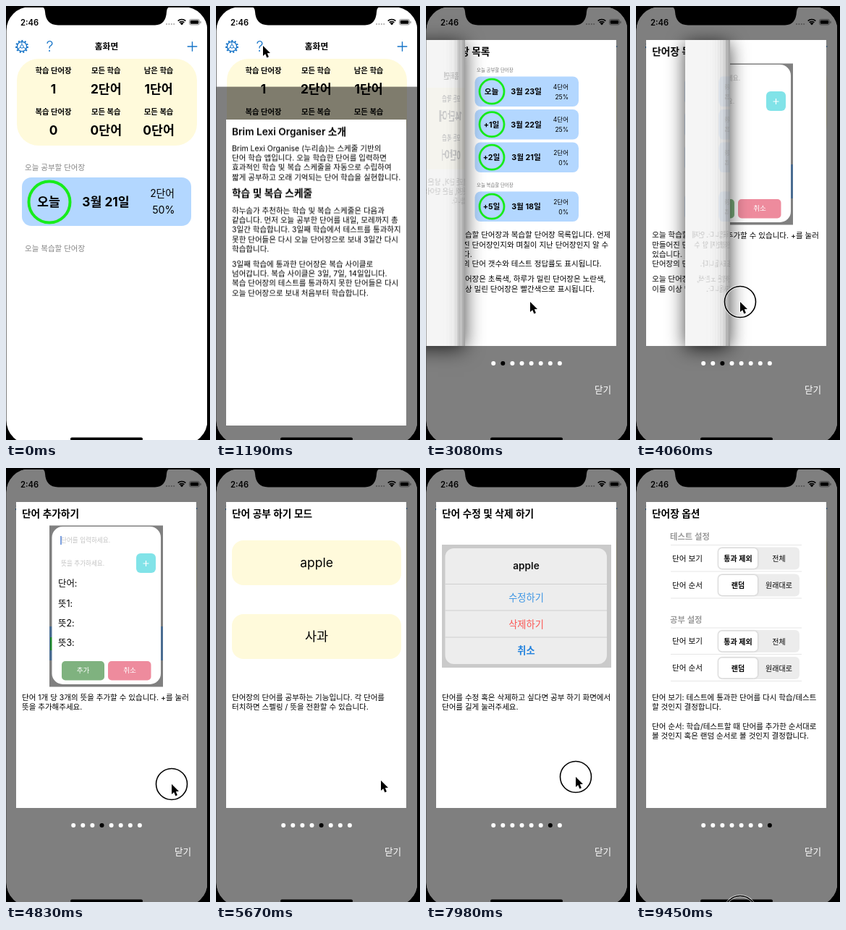
Write an HTML page with a canvas that moves like this. It is 282 px wide and 600 px high and loops after 9.52 s.

```html
<!DOCTYPE html>
<html lang="ko">
<head>
<meta charset="utf-8">
<title>단어장 도움말</title>
<style>
html, body { margin: 0; width: 100%; height: 100%; overflow: hidden; background: #000; }
canvas { display: block; width: 282px; height: 600px; }
</style>
</head>
<body>
<canvas id="stage"></canvas>
<script>
const W = 282, H = 600, LOOP = 9520, STEP = 70;
const PAGE = { x: 14, y: 47, w: 249, h: 423 };
const BLUE = '#1674c8', CARD = '#b3d7ff', CREAM = '#fffadb', GREEN = '#17ec1c';
const FONT = "Inter, 'Noto Sans CJK KR', 'Noto Sans CJK', sans-serif";
const scale = window.devicePixelRatio || 1;

function surface(canvas, w, h) {
  canvas.width = w * scale;
  canvas.height = h * scale;
  const g = canvas.getContext('2d');
  g.scale(scale, scale);
  return g;
}

function text(g, s, x, y, size, color = '#000', weight = 400, align = 'left') {
  g.font = `${weight} ${size}px ${FONT}`;
  g.fillStyle = color;
  g.textAlign = align;
  g.fillText(s, x, y + size * 0.36);
}
const mid = (g, s, x, y, size, color, weight) => text(g, s, x, y, size, color, weight, 'center');
const title = (g, s, y = 63) => text(g, s, 22, y, 13.7, '#000', 600);
const lines = (g, y, ...rows) => rows.forEach((s, i) => text(g, s, 22, y + i * 13.3, 10.5));

function box(g, x, y, w, h, r, color) {
  g.fillStyle = color;
  g.beginPath();
  g.roundRect(x, y, w, h, r);
  g.fill();
}
function ring(g, x, y, r, width, color) {
  g.strokeStyle = color;
  g.lineWidth = width;
  g.beginPath();
  g.arc(x, y, r, 0, 7);
  g.stroke();
}
function stroke(g, color, width, ...segments) {
  g.strokeStyle = color;
  g.lineWidth = width;
  g.beginPath();
  for (const [x1, y1, x2, y2] of segments) { g.moveTo(x1, y1); g.lineTo(x2, y2); }
  g.stroke();
}
const cross = (g, x, y, r, width, color) =>
  stroke(g, color, width, [x - r, y - r, x + r, y + r], [x - r, y + r, x + r, y - r]);
const plus = (g, x, y, r, width, color) =>
  stroke(g, color, width, [x - r, y, x + r, y], [x, y - r, x, y + r]);
const rule = (g, x1, x2, y, color = '#ddd') => stroke(g, color, 1, [x1, y, x2, y]);

function summary(g, values) {
  box(g, 15, 73, 249, 120, 30, CREAM);
  const labels = ['학습 단어장', '모든 학습', '남은 학습', '복습 단어장', '모든 복습', '모든 복습'];
  labels.forEach((label, i) => {
    const x = 65.5 + (i % 3) * 72.8, y = i < 3 ? 89 : 146.5;
    mid(g, label, x, y, 10.3, '#000', 600);
    mid(g, values[i], x, y + 25.5, 17.3, '#000', 700);
  });
}

function gear(g, x, y) {
  g.setLineDash([2, 2.6]);
  ring(g, x, y, 8, 2, BLUE);
  g.setLineDash([]);
  ring(g, x, y, 6.6, 1.4, BLUE);
  ring(g, x, y, 2.2, 1, BLUE);
  for (let a = 0.5; a < 6; a += 2.094)
    stroke(g, BLUE, 1, [x + 2 * Math.cos(a), y + 2 * Math.sin(a), x + 6 * Math.cos(a), y + 6 * Math.sin(a)]);
}

function statusBar(g) {
  text(g, '2:46', 20, 22.5, 11.2, '#000', 600);
  for (let i = 0; i < 4; i++) box(g, 221 + i * 3.4, 24, 2, 2, 1, '#a5a5a5');
  g.lineCap = 'butt';
  [2, 5, 8].forEach((r, i) => {
    g.strokeStyle = '#000';
    g.lineWidth = i ? 1.7 : 3;
    g.beginPath();
    g.arc(243, 26.5, r, -2.3, -0.84);
    g.stroke();
  });
  g.strokeStyle = '#777';
  g.lineWidth = 0.8;
  g.beginPath();
  g.roundRect(253.5, 18.5, 14, 7.5, 2.2);
  g.stroke();
  box(g, 254.7, 19.7, 11.6, 5.1, 1.2, '#000');
  box(g, 268.5, 21, 1, 3, 0.5, '#777');
}

function home(g) {
  g.fillStyle = '#fff';
  g.fillRect(0, 2, 278, H);
  statusBar(g);
  gear(g, 22, 56);
  mid(g, '?', 60.5, 56, 20, BLUE, 300);
  mid(g, '홈화면', 139, 55.5, 11.7, '#000', 600);
  plus(g, 257.5, 56, 6.8, 1.4, BLUE);
  summary(g, ['1', '2단어', '1단어', '0', '0단어', '0단어']);
  text(g, '오늘 공부할 단어장', 26, 223, 10.5, '#858585');
  box(g, 22, 237, 234, 67, 13, CARD);
  ring(g, 60, 271, 28.5, 4, GREEN);
  mid(g, '오늘', 59, 271, 17.3, '#000', 700);
  mid(g, '3월 21일', 138, 271, 17.3, '#000', 700);
  text(g, '2단어', 233, 259.5, 13.8, '#000', 400, 'right');
  text(g, '50%', 233.5, 282, 14.2, '#000', 400, 'right');
  text(g, '오늘 복습할 단어장', 26, 335, 10.5, '#858585');
  box(g, 89, 596.5, 100, 4, 2, '#000');
}

function dayCard(g, y, label, date, count, score) {
  box(g, 67.5, y, 143.5, 41.5, 8, CARD);
  ring(g, 91, y + 20.7, 17, 2.8, GREEN);
  mid(g, label, 90.5, y + 21, 10.7, '#000', 700);
  mid(g, date, 138.5, y + 21, 10.7, '#000', 700);
  text(g, count, 197, y + 14, 8.5, '#000', 400, 'right');
  text(g, score, 197, y + 28, 8.5, '#000', 400, 'right');
}

function counters(g, x, y) {
  g.strokeStyle = BLUE;
  g.lineWidth = 1.6;
  g.beginPath();
  g.roundRect(x + 3, y - 8.5, 12.5, 17, 2);
  g.stroke();
  stroke(g, BLUE, 1.3, [x + 3, y + 5, x + 15, y + 5], [x + 6, y - 8, x + 6, y + 4]);
  mid(g, 'A', x + 10.8, y - 2, 8, BLUE, 500);
  ring(g, x + 86, y, 8.5, 1.7, BLUE);
  cross(g, x + 165, y, 6.5, 1.7, BLUE);
  ['3 단어', '0 단어', '0 단어'].forEach((s, i) => {
    mid(g, s, x + 44.5 + i * 77, y, 9.4);
    rule(g, x, x + 58, y + 11.5, '#b5b5b5');
    x += 0.3;
    if (i < 2) rule(g, x + 77 * (i + 1), x + 58 + 77 * (i + 1), y + 11.5, '#b5b5b5');
  });
}

function segment(g, y, label, on, off) {
  text(g, label, 50, y, 10.6);
  box(g, 113, y - 15.5, 113, 31, 6, '#ececec');
  g.shadowColor = 'rgba(0,0,0,.25)';
  g.shadowBlur = 3;
  box(g, 114, y - 14, 54, 28, 5, '#fff');
  g.shadowBlur = 0;
  mid(g, on, 141, y + 0.5, 10, '#000', 600);
  mid(g, off, 197.5, y + 0.5, 10);
}

function options(g, y, name) {
  text(g, name, 47, y, 11.3, '#999', 600);
  [11.5, 48, 85].forEach(d => rule(g, 48, 229, y + d, '#e6e6e6'));
  segment(g, y + 30, '단어 보기', '통과 제외', '전체');
  segment(g, y + 67, '단어 순서', '랜덤', '원래대로');
}

const pages = [
  g => {
    title(g, 'Brim Lexi Organiser 소개', 64);
    lines(g, 87, 'Brim Lexi Organise (누리솜)는 스케줄 기반의', '단어 학습 앱입니다. 오늘 학습한 단어를 입력하면',
      '효과적인 학습 및 복습 스케줄을 자동으로 수립하여', '짧게 공부하고 오래 기억되는 단어 학습을 실현합니다.');
    title(g, '학습 및 복습 스케줄', 149.5);
    lines(g, 173, '하누솜가 추천하는 학습 및 복습 스케줄은 다음과', '같습니다. 먼저 오늘 공부한 단어를 내일, 모레까지 총',
      '3일간 학습합니다. 3일째 학습에서 테스트를 통과하지', '못한 단어들은 다시 오늘 단어장으로 보내 3일간 다시', '학습합니다.');
    lines(g, 247, '3일째 학습에 통과한 단어장은 복습 사이클로', '넘어갑니다. 복습 사이클은 3일, 7일, 14일입니다.',
      '복습 단어장의 테스트를 통과하지 못한 단어들은 다시', '오늘 단어장으로 보내 처음부터 학습합니다.');
  },
  g => {
    title(g, '홈 화면');
    g.save();
    g.translate(139, 97);
    g.scale(0.94, 0.94);
    g.translate(-139, -56);
    gear(g, 26, 56);
    mid(g, '홈화면', 139, 56, 11.7, '#000', 600);
    plus(g, 252, 56, 6.8, 1.4, BLUE);
    summary(g, ['3', '14단어', '10단어', '1', '0단어', '0단어']);
    g.restore();
    lines(g, 243, '오늘 공부할 단어장, 모든 단어, 남은 단어의 갯수와', '복습할 단어장, 모든 단어, 남은 단어의 갯수를', '한눈에 확인할 수 있습니다.');
  },
  g => {
    title(g, '단어장 목록');
    text(g, '오늘 공부할 단어장', 70, 89, 6.4, '#777');
    dayCard(g, 97.5, '오늘', '3월 23일', '4단어', '25%');
    dayCard(g, 143, '+1일', '3월 22일', '4단어', '25%');
    dayCard(g, 188.5, '+2일', '3월 21일', '2단어', '0%');
    text(g, '오늘 복습할 단어장', 70, 248, 6.4, '#777');
    dayCard(g, 256.5, '+5일', '3월 18일', '2단어', '0%');
    lines(g, 316.5, '오늘 학습할 단어장과 복습할 단어장 목록입니다. 언제', '만들어진 단어장인지와 며칠이 지난 단어장인지 알 수',
      '있습니다.', '단어장의 단어 갯수와 테스트 정답률도 표시됩니다.');
    lines(g, 377.5, '오늘 단어장은 초록색, 하루가 밀린 단어장은 노란색,', '이틀 이상 밀린 단어장은 빨간색으로 표시됩니다.');
  },
  g => {
    title(g, '단어 추가하기');
    g.fillStyle = '#808080';
    g.fillRect(60, 79.5, 157, 223);
    g.fillStyle = '#4a6c91';
    g.fillRect(60, 219, 157, 47);
    g.fillStyle = '#208a2c';
    g.fillRect(61, 234, 4, 18);
    box(g, 63.5, 81, 150.5, 218, 15, '#fff');
    text(g, '단어를 입력하세요.', 76, 100, 8.6, '#c2c2c2');
    stroke(g, '#3a70d0', 1.3, [76, 94, 76, 106]);
    text(g, '뜻을 추가하세요.', 76, 131.5, 8.6, '#c2c2c2');
    box(g, 180, 118, 27, 27, 6, '#81e3e8');
    plus(g, 193.5, 132, 4, 1.2, '#fff');
    ['단어:', '뜻1:', '뜻2:', '뜻3:'].forEach((s, i) => text(g, s, 72, 160 + i * 27.2, 12.4));
    box(g, 77, 267, 59, 26.5, 5, '#7fb27f');
    box(g, 141, 267, 59.5, 26.5, 5, '#ee8b9d');
    mid(g, '추가', 106.5, 280, 9.6, '#fff');
    mid(g, '취소', 171, 280, 9.6, '#fff');
    lines(g, 317, '단어 1개 당 3개의 뜻을 추가할 수 있습니다. +를 눌러', '뜻을 추가해주세요.');
  },
  g => {
    title(g, '단어 공부 하기 모드');
    box(g, 22, 100, 234, 62, 16, CREAM);
    mid(g, 'apple', 139, 131, 17.5);
    box(g, 22, 202, 234, 62, 16, CREAM);
    mid(g, '사과', 139, 233, 17.5);
    lines(g, 317, '단어장의 단어를 공부하는 기능입니다. 각 단어를', '터치하면 스펠링 / 뜻을 전환할 수 있습니다.');
  },
  g => {
    title(g, '단어 테스트 하기 모드');
    counters(g, 32, 103);
    ring(g, 45, 157.5, 15.5, 3.6, '#0508b4');
    box(g, 73, 130, 183, 57.5, [18, 0, 0, 18], CREAM);
    mid(g, 'apple', 185, 158, 17.5);
    counters(g, 33.5, 219.5);
    box(g, 23, 247, 183, 57.5, [0, 18, 18, 0], CREAM);
    mid(g, 'apple', 92.5, 275, 17.5);
    g.lineCap = 'round';
    cross(g, 230, 275, 13, 4.5, '#e50d10');
    g.lineCap = 'butt';
    lines(g, 324.5, '단어장의 테스트하는 기능입니다. 마찬가지로 각', '단어를 터치하면 스펠링 / 뜻을 전환할 수 있습니다.');
    lines(g, 364, '오른쪽으로 스와이프하면 정답 처리, 왼쪽으로', '스와이프하면 오답 처리를 할 수 있습니다.');
    lines(g, 404, '상단에 남은 단어, 정답 단어, 오답 단어의', '갯수가 표시됩니다.');
  },
  g => {
    title(g, '단어 수정 및 삭제 하기');
    g.fillStyle = '#cacaca';
    g.fillRect(22, 106, 234, 170);
    box(g, 26.5, 111, 223.5, 160, 12, '#ededed');
    [160.5, 197, 234].forEach(y => rule(g, 26.5, 250, y, '#cfcfcf'));
    mid(g, 'apple', 138.5, 135, 13.6, '#111', 600);
    mid(g, '수정하기', 138.5, 179, 13.2, '#3a94e4', 500);
    mid(g, '삭제하기', 138.5, 216, 13.2, '#fb5653', 500);
    mid(g, '취소', 138.5, 252.5, 13.2, '#2483de', 700);
    lines(g, 317, '단어를 수정 혹은 삭제하고 싶다면 공부 하기 화면에서', '단어를 길게 눌러주세요.');
  },
  g => {
    title(g, '단어장 옵션');
    options(g, 95, '테스트 설정');
    options(g, 209.5, '공부 설정');
    lines(g, 317, '단어 보기: 테스트에 통과한 단어를 다시 학습/테스트', '할 것인지 결정합니다.');
    lines(g, 357, '단어 순서: 학습/테스트할 때 단어를 추가한 순서대로', '볼 것인지 혹은 랜덤 순서로 볼 것인지 결정합니다.');
  }
];

function sheet(draw) {
  const canvas = document.createElement('canvas');
  const g = surface(canvas, PAGE.w, PAGE.h);
  draw(g);
  return canvas;
}
const fronts = pages.map(draw => sheet(g => {
  g.fillStyle = '#fff';
  g.fillRect(0, 0, PAGE.w, PAGE.h);
  g.translate(-PAGE.x, -PAGE.y);
  draw(g);
}));
const backs = fronts.map(front => sheet(g => {
  g.fillStyle = '#f3f3f3';
  g.fillRect(0, 0, PAGE.w, PAGE.h);
  g.globalAlpha = 0.17;
  g.drawImage(front, 0, 0, PAGE.w, PAGE.h);
}));

// Rolls the sheet over a vertical cylinder whose tangent line sits at `axis`.
function curl(g, index, axis) {
  const r = 64, half = Math.PI * r / 2, right = PAGE.x + PAGE.w;
  const place = d => d <= 0 ? axis + d : d < 2 * half ? axis + r * Math.sin(d / r) : axis + 2 * half - d;
  const strips = (image, from, to) => {
    for (let i = Math.max(0, from); i < Math.min(PAGE.w, to); i++) {
      const d = PAGE.x + i - axis, a = place(d), b = place(d + 1);
      const x = Math.min(a, b), w = Math.abs(b - a) + 0.6;
      g.drawImage(image, i * scale, 0, scale, PAGE.h * scale, x, PAGE.y, w, PAGE.h);
      if (d > 0 && d < 2 * half) {
        g.fillStyle = `rgba(0,0,0,${0.45 * Math.sin(d / r) ** 8})`;
        g.fillRect(x, PAGE.y, w, PAGE.h);
      }
    }
  };
  const turn = Math.floor(axis + half - PAGE.x);
  const edge = place(right - axis);
  const fold = right - axis > half ? axis + r : edge;
  strips(fronts[index], 0, turn);
  g.save();
  g.shadowColor = 'rgba(0,0,0,.75)';
  g.shadowBlur = 26 * scale;
  g.shadowOffsetY = 4 * scale;
  g.fillStyle = '#777';
  const left = Math.min(edge, fold - 2);
  g.fillRect(left, PAGE.y, fold - left, PAGE.h);
  g.restore();
  strips(backs[index], turn, PAGE.w);
}

// Each swipe: start time and pointer position where the drag begins.
const swipes = [
  [1820, 226, 430], [2800, 230, 428], [3850, 230, 432], [4830, 229, 437],
  [5880, 228, 432], [7000, 224, 427], [7980, 207, 427]
];
const TURN = 360, TURN_DELAY = 70;
const path = [[70, 144, 620], [770, 65, 55], [1330, 65, 55], [1680, 226, 430]];
const presses = [[840, 980], [9450, LOOP]];
swipes.forEach(([at, x, y], i) => {
  const [, nx, ny] = swipes[i + 1] || [0, 144, 613];
  path.push([at, x, y], [at + 210, 144, 409], [at + 330, 144, 409], [at + 730, nx, ny]);
  presses.push([i === 5 ? 6790 : at, at + 210]);
});

function pointerAt(t) {
  const next = path.findIndex(k => k[0] > t);
  if (next === 0) return path[0].slice(1);
  if (next < 0) return path[path.length - 1].slice(1);
  const [t0, x0, y0] = path[next - 1], [t1, x1, y1] = path[next];
  const u = (t - t0) / (t1 - t0), e = u * u * (3 - 2 * u);
  return [x0 + (x1 - x0) * e, y0 + (y1 - y0) * e];
}

function pointer(g, t) {
  const [x, y] = pointerAt(t);
  if (presses.some(([a, b]) => t >= a && t <= b)) {
    ring(g, x, y, 21.5, 3.4, 'rgba(255,255,255,.6)');
    ring(g, x, y, 21.5, 1.6, '#000');
  }
  g.save();
  g.translate(x, y);
  g.beginPath();
  [[0, 0], [0, 14], [3.2, 11.2], [5.4, 16.4], [7.9, 15.3], [5.8, 10.3], [10, 10]].forEach(p => g.lineTo(...p));
  g.closePath();
  g.lineJoin = 'round';
  g.strokeStyle = '#fff';
  g.lineWidth = 2;
  g.stroke();
  g.fillStyle = '#000';
  g.fill();
  g.restore();
}

function guide(g, t) {
  const current = swipes.filter(([at]) => t >= at + TURN_DELAY + TURN).length;
  const rise = t > 1680 ? 0 : 600 * Math.exp(-(t - 1003) / 110);
  g.save();
  g.translate(0, rise);
  g.fillStyle = 'rgba(0,0,0,.5)';
  g.fillRect(0, 2, 278, H);
  const swipe = swipes[current];
  const u = swipe ? (t - swipe[0] - TURN_DELAY) / TURN : 0;
  const turning = u > 0;
  g.drawImage(fronts[turning ? current + 1 : current], PAGE.x, PAGE.y, PAGE.w, PAGE.h);
  if (turning) curl(g, current, 263 - 345 * Math.sin(u * Math.PI / 2));
  for (let i = 0; i < 8; i++) box(g, 90.2 + i * 13.1, 491, 6, 6, 3, i === current ? '#000' : '#fff');
  mid(g, '닫기', 244.5, 530.5, 12.6, '#fff');
  g.restore();
}

function notch(g) {
  g.fillStyle = '#000';
  g.fillRect(0, 0, W, 2);
  g.beginPath();
  g.moveTo(48, 0);
  g.quadraticCurveTo(54, 2, 54, 8);
  g.quadraticCurveTo(55, 26, 72, 26.5);
  g.lineTo(206, 26.5);
  g.quadraticCurveTo(221, 26, 222, 8);
  g.quadraticCurveTo(222, 2, 228, 0);
  g.fill();
}

const g = surface(document.getElementById('stage'), W, H);

function paint(t) {
  g.fillStyle = '#000';
  g.fillRect(0, 0, W, H);
  g.save();
  g.beginPath();
  g.roundRect(0.5, 1, 278, 605, 33);
  g.clip();
  home(g);
  if (t >= 1050) guide(g, t);
  g.restore();
  notch(g);
  pointer(g, t);
}

const start = performance.now();
function tick() {
  const t = (performance.now() - start) % LOOP;
  paint(Math.floor(t / STEP) * STEP);
  requestAnimationFrame(tick);
}
tick();
</script>
</body>
</html>
```
